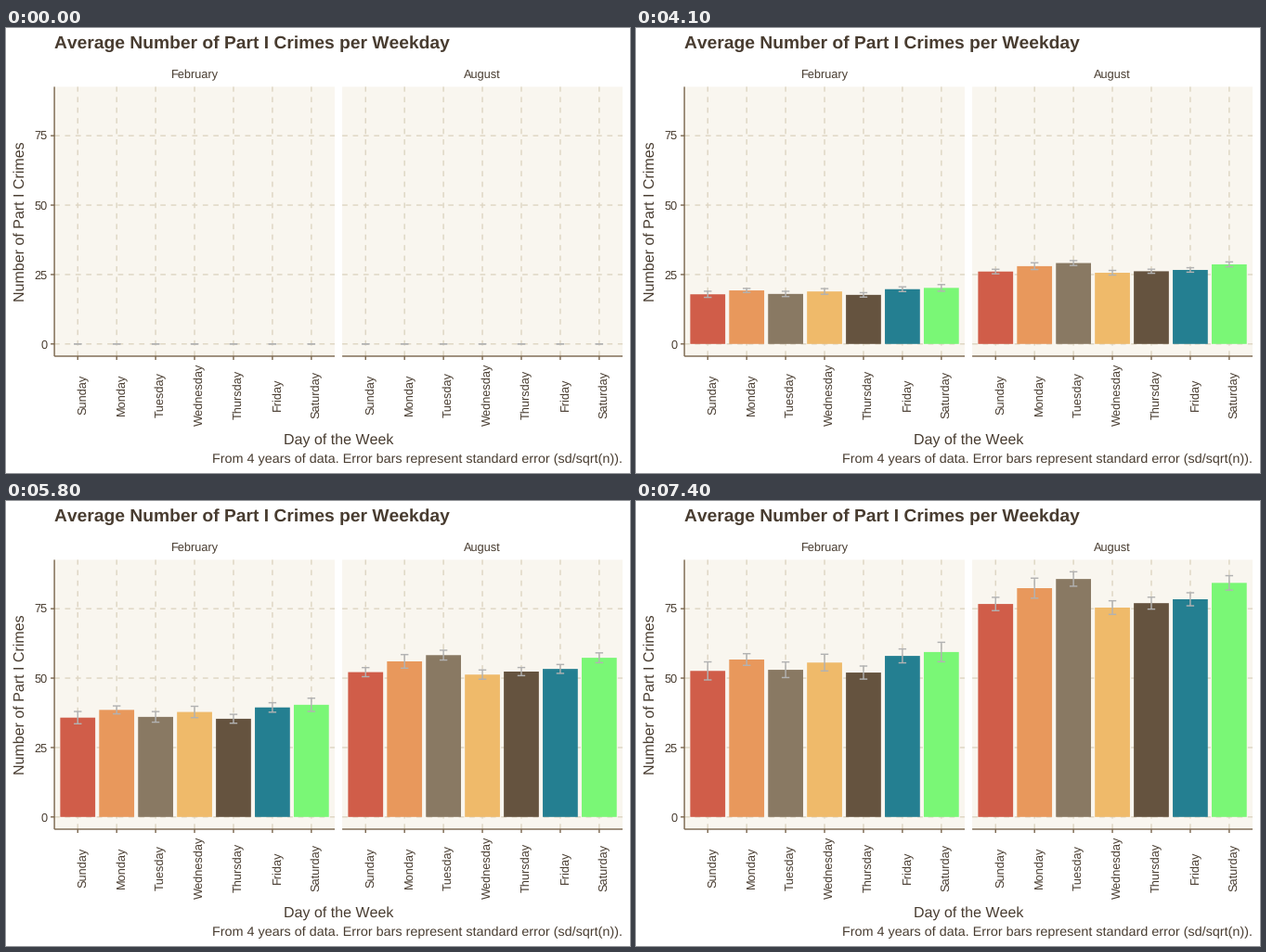
A matplotlib script that plays this animation: 672 px wide and 480 px high, repeating every 10000 ms.

```python
import matplotlib.pyplot as plt
from matplotlib.animation import FuncAnimation
from matplotlib.collections import LineCollection
from matplotlib.patches import Rectangle

plt.rcParams.update({
    "font.family": "Liberation Sans",
    "path.snap": False,
    "text.hinting": "none",
    "text.hinting_factor": 8,
    "text.kerning_factor": 6,
})

W, H, DPI = 672, 480, 96
FRAMES, INTERVAL = 100, 100
GROW_START, GROW_STEPS = 24, 50

INK, LINE, GRID = "#483c30", "#7c6850", "#ded6c3"
PAPER, ERROR = "#f9f6ef", "#b2b2b2"
COLORS = ["#d05d49", "#e8985c", "#897963", "#efba6a", "#65533f", "#247f91", "#7af776"]
DAYS = ["Sunday", "Monday", "Tuesday", "Wednesday", "Thursday", "Friday", "Saturday"]

# month: (panel left edge, daily means, standard errors)
PANELS = {
    "February": (52.1, [52.6, 56.7, 53.0, 55.6, 52.0, 58.0, 59.4],
                 [3.25, 2.1, 2.8, 3.0, 2.35, 2.5, 3.5]),
    "August": (362.1, [76.7, 82.4, 85.7, 75.4, 77.0, 78.4, 84.3],
               [2.4, 3.6, 2.6, 2.45, 2.15, 2.35, 2.6]),
}
PANEL_W, TOP, BOTTOM = 301.9, 63.4, 354.0
STEP = PANEL_W / 7.2
ZERO, UNIT = 340.8, 2.995
LW = 1.07


def level(value):
    return ZERO - UNIT * value


fig = plt.figure(figsize=(W / DPI, H / DPI), dpi=DPI, facecolor="white")
ax = fig.add_axes([0, 0, 1, 1])
ax.set(xlim=(0, W), ylim=(H, 0))
ax.axis("off")


def label(x, y, text, px, **kw):
    style = dict(ha="center", va="baseline", rotation_mode="anchor", color=INK)
    ax.text(x, y, text, fontsize=px * 72 / DPI, **{**style, **kw})


def line(x0, y0, x1, y1, color=LINE, **kw):
    ax.plot([x0, x1], [y0, y1], color=color, lw=LW, solid_capstyle="butt",
            dash_capstyle="butt", **kw)


def grid_line(x0, y0, x1, y1):
    line(x0, y0, x1, y1, GRID, ls=(0, (4, 4)), zorder=1)


def box(x, y, width, height, color, zorder):
    return ax.add_patch(Rectangle((x, y), width, height, fc=color, lw=0,
                                  snap=True, zorder=zorder))


bars = []
for month, (left, means, errors) in PANELS.items():
    right = left + PANEL_W
    box(left, TOP, PANEL_W, BOTTOM - TOP, PAPER, 0)
    label((left + right) / 2, 54, month, 12.8)
    for value in (0, 25, 50, 75):
        grid_line(left, level(value), right, level(value))
    for i, (day, color, mean, error) in enumerate(zip(DAYS, COLORS, means, errors)):
        x = left + STEP * (0.6 + i)
        grid_line(x, BOTTOM, x, TOP)
        line(x, BOTTOM, x, BOTTOM + 4, zorder=5)
        label(x + 9.2, 395.2, day, 12.8, rotation=90)
        bar = box(x - 0.45 * STEP, ZERO, 0.9 * STEP, 0, color, 2)
        bars.append((bar, x, mean, error))
    line(left, BOTTOM, right, BOTTOM, zorder=5)

axis_x = PANELS["February"][0]
line(axis_x, TOP, axis_x, BOTTOM, zorder=5)
for value in (0, 25, 50, 75):
    line(axis_x - 4, level(value), axis_x, level(value), zorder=5)
    label(45, level(value) + 4.6, str(value), 12.8, ha="right")

label(52.2, 21.8, "Average Number of Part I Crimes per Weekday", 19.2,
      ha="left", weight="bold")
label(19.5, 208.9, "Number of Part I Crimes", 16, rotation=90)
label(358, 448.5, "Day of the Week", 16)
label(664, 469, "From 4 years of data. Error bars represent standard error (sd/sqrt(n)).",
      14.4, ha="right")

whiskers = LineCollection([], colors=ERROR, linewidths=LW, zorder=3)
ax.add_collection(whiskers, autolim=False)


def update(frame):
    grow = min(max((frame - GROW_START) / GROW_STEPS, 0), 1)
    segments = []
    for bar, x, mean, error in bars:
        bar.set_height(-UNIT * mean * grow)
        high, low = level((mean + error) * grow), level((mean - error) * grow)
        cap = 0.1 * STEP
        segments += [[(x - cap, y), (x + cap, y)] for y in (high, low)]
        segments.append([(x, high), (x, low)])
    whiskers.set_segments(segments)
    return [bar for bar, *_ in bars] + [whiskers]


anim = FuncAnimation(fig, update, frames=FRAMES, interval=INTERVAL,
                     repeat=True, repeat_delay=0, blit=False)
plt.show()
```
